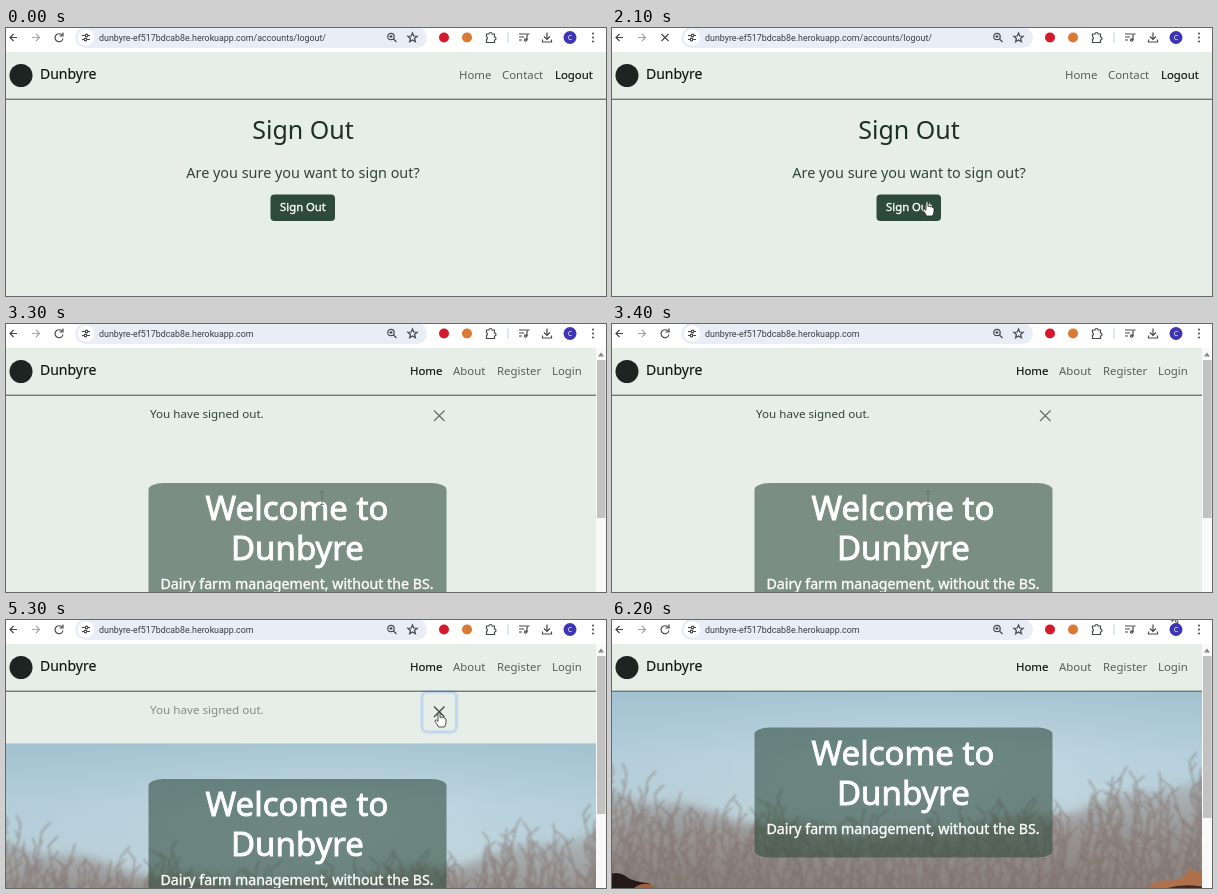
Write an HTML page that moves like this. It is 600 by 268 pixels and loops after 6300 ms.

```html
<!DOCTYPE html>
<html lang="en">
<head>
<meta charset="utf-8">
<title>Signing out</title>
<style>
  html, body { margin: 0; height: 100%; overflow: hidden; background: #fff; }
  svg { display: block; width: 100%; height: 100%; }
  text { font-family: "Noto Sans", "Open Sans", sans-serif; fill: #1d3028; }
  .mid { text-anchor: middle; }
  .nav text { font-size: 11.4px; fill: #56605a; }
  .nav .on, .brand { fill: #0c1410; stroke: #0c1410; stroke-width: .15; }
  .url { font: 8.87px Roboto, sans-serif; fill: #3a3d42; }
  .white text { fill: #fff; stroke: #fff; stroke-width: .35; }
  .white .title { font-size: 33px; stroke-width: .9; }
  .icon { fill: none; stroke: #45484c; stroke-width: 1.2; }
</style>
</head>
<body>
<svg viewBox="0 0 600 268">
  <defs>
    <linearGradient id="sky" x2="0" y2="1">
      <stop offset="0" stop-color="#a8c7d4"/>
      <stop offset=".3" stop-color="#bdd7e2"/>
      <stop offset=".6" stop-color="#c6d9e0"/>
      <stop offset="1" stop-color="#b3b9ba"/>
    </linearGradient>
    <radialGradient id="glow" cx=".55" cy=".4" r=".6">
      <stop offset="0" stop-color="#cfe3ec" stop-opacity=".5"/>
      <stop offset="1" stop-color="#93b0be" stop-opacity=".25"/>
    </radialGradient>
    <linearGradient id="thicket" x2="0" y2="1">
      <stop offset="0" stop-color="#8b7a74" stop-opacity=".2"/>
      <stop offset=".5" stop-color="#85756e" stop-opacity=".65"/>
      <stop offset="1" stop-color="#7d6f68" stop-opacity=".85"/>
    </linearGradient>
    <filter id="soft" x="-10%" y="-20%" width="120%" height="140%"><feGaussianBlur stdDeviation="5"/></filter>
    <filter id="fine" x="-10%" y="-20%" width="120%" height="140%"><feGaussianBlur stdDeviation="1.3"/></filter>
    <clipPath id="view"><path d="M0 71.500H590V268H0Z"/></clipPath>
  </defs>

  <rect y="24" width="600" height="244" fill="#e6eee7"/>

  <g id="logoutPage">
    <g class="nav">
      <text x="453" y="51">Home</text><text x="496" y="51">Contact</text><text x="549" y="51" class="on">Logout</text>
    </g>
    <text class="mid" x="297" y="111" font-size="25">Sign Out</text>
    <text class="mid" x="297" y="149.5" font-size="14.4" fill-opacity=".9">Are you sure you want to sign out?</text>
    <rect x="264.5" y="166.5" width="64.5" height="26.5" rx="4" fill="#2d4a3a"/>
    <g class="white"><text class="mid" x="297" y="183" font-size="11.3">Sign Out</text></g>
  </g>

  <g id="homePage">
    <g class="nav">
      <text x="404" y="51" class="on">Home</text><text x="447" y="51">About</text>
      <text x="491" y="51">Register</text><text x="546" y="51">Login</text>
    </g>
    <g id="alert">
      <text x="144" y="94.3" font-size="11.65" id="message">You have signed out.</text>
      <rect id="ring" x="416" y="72" width="34.5" height="40" rx="5" fill="none" stroke="#c0d9ee" stroke-width="3"/>
      <path id="close" d="M428 86.500l10.500 10.500M438.500 86.500l-10.500 10.500" stroke-width="1.3"/>
    </g>
    <g clip-path="url(#view)">
      <g id="hero">
        <g id="photo">
          <rect y="123.500" width="590" height="200" fill="url(#sky)"/>
          <rect y="123.500" width="590" height="200" fill="url(#glow)"/>
          <path id="treeline" fill="url(#thicket)" filter="url(#soft)"/>
          <path id="branches" fill="none" stroke="#75625c" stroke-width="1.700" stroke-opacity=".45" filter="url(#fine)"/>
          <path d="M0 305Q8 303 14 308T38 315V324H0Z" fill="#231b19"/>
          <path d="M18 324Q26 313 40 316L46 324Z" fill="#a25f3a"/>
          <path d="M532 324Q540 311 556 312T576 301L590 304V324Z" fill="#b0704c"/>
          <path d="M545 324Q562 314 590 318V324Z" fill="#4a2a20"/>
        </g>
        <rect x="142.500" y="159" width="298" height="130" rx="15" ry="6.500" fill="#2f4a3c" fill-opacity=".58"/>
        <g class="white">
          <text class="mid title" x="291" y="196">Welcome to</text>
          <text class="mid title" x="291.500" y="236">Dunbyre</text>
          <text class="mid" x="291" y="265" font-size="14.200">Dairy farm management, without the BS.</text>
        </g>
      </g>
    </g>
    <rect x="590" y="24" width="10" height="244" fill="#f8f9f8"/>
    <path d="M592 32.500l3-4 3 4Z" fill="#858585"/>
    <rect id="thumb" x="591" y="36" width="8.500" fill="#c1c2c1"/>
  </g>

  <circle cx="15" cy="47.500" r="11.500" fill="#1d2422"/>
  <text class="brand" x="34" y="51.300" font-size="14">Dunbyre</text>
  <path id="navLine" stroke="#3d4c44"/>

  <rect width="600" height="24" fill="#fff"/>
  <rect x="69" y="-1" width="352" height="21" rx="10.500" fill="#e9eef6"/>
  <circle cx="80" cy="9.500" r="8" fill="#fff"/>
  <text class="url" x="93" y="12.800" id="address"></text>
  <g class="icon">
    <path d="M11 9.500H4M7.500 6L4 9.500L7.500 13"/>
    <path d="M26 9.500H33.500M30 6l3.500 3.500L30 13" stroke="#a3a5a8"/>
    <path id="reload" d="M56 7A4 4 0 1 0 57 10.500M57 4.500V8H53.500"/>
    <path id="stop" d="M49.500 6l7 7M56.500 6l-7 7"/>
    <path d="M76 7.500H79M82 7.500H84M76 11.500H78M81 11.500H84"/>
    <circle cx="80.500" cy="7.500" r="1.300"/><circle cx="79.500" cy="11.500" r="1.300"/>
    <circle cx="385" cy="8.500" r="3.200"/><path d="M387.500 11l3 3M383.500 8.500h3M385 7v3"/>
    <path d="M406.500 5l1.300 3 3.400.300-2.600 2.200.800 3.300-2.900-1.800-2.900 1.800.800-3.300-2.600-2.200 3.400-.300Z"/>
    <path d="M480.500 6h2.500a1.500 1.500 0 0 1 3 0h2.500v3a1.500 1.500 0 0 1 0 3v2.500h-8v-3a1.500 1.500 0 0 0 0-2.800Z"/>
    <path d="M502 4V15" stroke="#c9d9ef"/>
    <path d="M513 6h7M513 9h5M513 12h3M521 12V6h2.500"/><circle cx="519.700" cy="12" r="1.200"/>
    <path d="M541 4.500V11M538 8.500l3 3 3-3M536.500 11.500V14h9V11.500"/>
  </g>
  <circle cx="438" cy="9.500" r="5" fill="#d5182b"/>
  <circle cx="461" cy="9.500" r="5" fill="#dc7a35"/>
  <circle cx="564" cy="9.500" r="6.500" fill="#3d35b4"/>
  <text class="mid" x="564" y="12" style="font-size:7px;fill:#fff">C</text>
  <g fill="#45484c"><circle cx="587" cy="5.500" r="1"/><circle cx="587" cy="9.500" r="1"/><circle cx="587" cy="13.500" r="1"/></g>

  <g id="cursor" stroke-linejoin="round">
    <path id="arrow" d="M0 0V11.500L2.700 9.200L4.500 13.500L6.200 12.800L4.400 8.700H8Z" fill="#fff" stroke="#222" stroke-width=".8"/>
    <path id="hand" d="M-1 1Q0-.5 1 1V5.500Q2.300 4.300 3.200 5.800Q4.500 4.900 5.200 6.300Q7 5.900 7 7.800V11Q6.500 13 5.500 15H-.5Q-2 11.500-4 9.500Q-4 7.500-2.600 8L-1 9.500Z" fill="#fff" stroke="#222" stroke-width=".8"/>
    <path id="beam" d="M-2-6.500H2M0-6.500V6.500M-2 6.500H2" fill="none" stroke="#5f7166" stroke-width=".8"/>
  </g>
</svg>
<script>
const LOOP = 6300, STEP = 100;
const $ = id => document.getElementById(id);
const show = (id, visible) => $(id).setAttribute('visibility', visible ? 'inherit' : 'hidden');
const set = (id, name, value) => $(id).setAttribute(name, value);

// Cursor stops: time, x, y. Each list is one uninterrupted movement.
const MOVES = [
  [[1100, 342, 131], [1200, 357, 140], [1300, 348, 156], [1400, 331, 167], [1500, 320, 172], [1600, 315, 173], [3200, 315, 173]],
  [[3200, 316, 174], [4500, 316, 174]],
  [[4500, 389, 103], [4700, 411, 99], [4900, 426, 94], [5100, 433, 92], [5400, 433, 92], [5600, 485, 55], [5800, 545, 4], [5900, 560, -10], [6300, 560, -10]]
];

function cursorAt(t) {
  const move = MOVES.find(m => t >= m[0][0] && t < m[m.length - 1][0]);
  if (!move) return null;
  const i = move.findIndex(stop => stop[0] > t);
  const [t0, x0, y0] = move[i - 1], [t1, x1, y1] = move[i];
  const k = (t - t0) / (t1 - t0);
  return [x0 + (x1 - x0) * k, y0 + (y1 - y0) * k];
}

// The thicket is tall at both sides and low behind the banner.
function growTrees() {
  let seed = 7;
  const random = () => (seed = seed * 16807 % 2147483647) / 2147483647;
  const top = x => 266 - 56 * Math.abs((x - 270) / 320) ** 1.5 + 4 * Math.sin(x / 17);
  let line = 'M-20 340', twigs = '';
  for (let x = -20; x <= 610; x += 5) {
    line += `L${x} ${top(x).toFixed(1)}`;
    let px = x, py = 325;
    const tip = top(x) - 12 + random() * 40;
    twigs += `M${px} ${py}`;
    while (py > tip) {
      px += (random() - .5) * 12;
      py -= 8 + random() * 10;
      const side = (random() - .5) * 24;
      twigs += `L${px.toFixed(1)} ${py.toFixed(1)}l${side.toFixed(1)} -9m${(-side).toFixed(1)} 9`;
    }
  }
  set('treeline', 'd', line + 'L610 340Z');
  set('branches', 'd', twigs);
}

function render(t) {
  const home = t >= 3200, closed = t >= 5400, pressed = t >= 5200;
  const loading = t >= 2000 && !home;
  show('logoutPage', !home);
  show('homePage', home);
  show('reload', !loading);
  show('stop', loading);
  $('address').textContent = 'dunbyre-ef517bdcab8e.herokuapp.com' + (home ? '' : '/accounts/logout/');
  set('navLine', 'd', `M0 71.2H${home ? 590 : 600}`);

  show('photo', home && t >= 4000);
  set('hero', 'transform', `translate(0 ${closed ? -51.5 : 0})`);
  set('thumb', 'height', closed ? 162 : 158);

  show('alert', home && !closed);
  show('ring', home && pressed && !closed);
  set('message', 'opacity', t >= 5300 ? .5 : .9);
  set('close', 'stroke', t >= 5000 ? '#3c4641' : '#68716b');

  const at = cursorAt(t);
  show('cursor', at);
  if (!at) return;
  const [x, y] = at;
  const beam = home && t < 4500;
  const overButton = !home && x > 264 && x < 329 && y > 166;
  const overClose = home && !closed && x > 426 && y < 112;
  const hand = overButton || overClose;
  show('beam', beam);
  show('hand', hand);
  show('arrow', !beam && !hand);
  set('cursor', 'transform', `translate(${x} ${y})`);
}

function tick() {
  render(Math.floor(performance.now() % LOOP / STEP) * STEP);
  requestAnimationFrame(tick);
}
growTrees();
tick();
</script>
</body>
</html>
```
